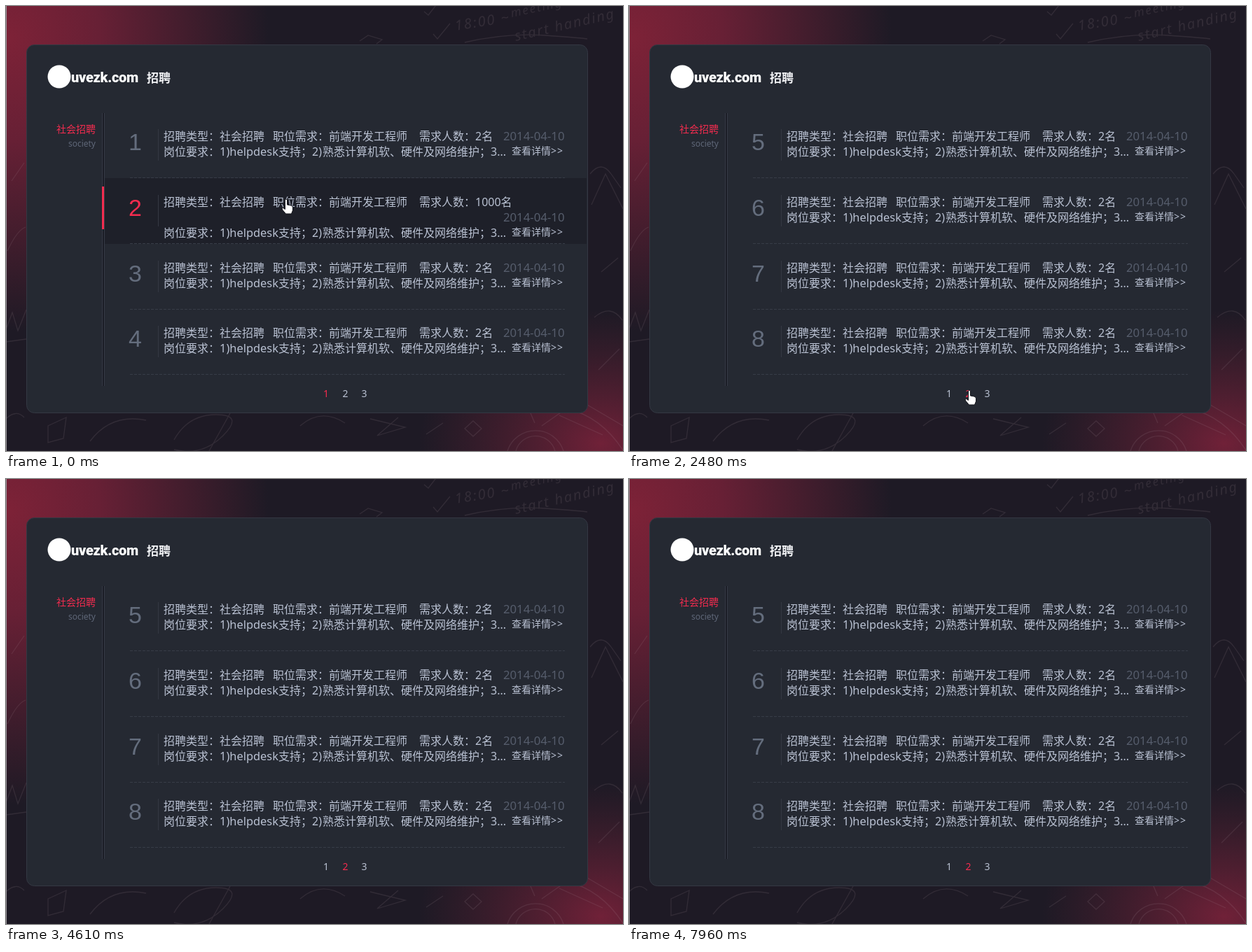
An HTML page for the animation above (8.61 s loop, 881 by 636 pixels).

```html
<!DOCTYPE html>
<html lang="zh-CN">
<head>
<meta charset="utf-8">
<title>招聘</title>
<style>
html, body { margin: 0; width: 100%; height: 100%; overflow: hidden; background: #1e1a25; }
svg { display: block; width: 881px; height: 636px; overflow: hidden; }
text { font-family: "Noto Sans", "Noto Sans CJK SC", "Noto Sans CJK", sans-serif; white-space: pre; }
.num { font-family: "Liberation Sans", Arial, sans-serif; }
.logo { font-family: Roboto, sans-serif; font-weight: 900; letter-spacing: -.3px; }
.chalk { fill: none; stroke: #b9a3ac; stroke-width: 1.3; opacity: .13; }
.chalk text { fill: #b9a3ac; stroke: none; font-style: italic; font-weight: 300; letter-spacing: 2px; }
</style>
</head>
<body>
<svg viewBox="0 0 881 636">
  <defs>
    <radialGradient id="warm" gradientUnits="userSpaceOnUse" cx="0" cy="0" r="1" gradientTransform="translate(5 45) scale(370 420)">
      <stop offset="0" stop-color="#7d2237"/>
      <stop offset=".35" stop-color="#672035"/>
      <stop offset="1" stop-color="#672035" stop-opacity="0"/>
    </radialGradient>
    <radialGradient id="corner" gradientUnits="userSpaceOnUse" cx="0" cy="0" r="1" gradientTransform="translate(850 625) scale(260 190)">
      <stop offset="0" stop-color="#702138"/>
      <stop offset="1" stop-color="#5c2033" stop-opacity="0"/>
    </radialGradient>
  </defs>
  <rect width="881" height="636" fill="#1e1a25"/>
  <rect width="881" height="636" fill="url(#warm)"/>
  <rect width="881" height="636" fill="url(#corner)"/>
  <g class="chalk">
    <path d="M597 8l6 5 14-18M610 40l6 7 18-22M505 50l12-8 20 6-8 6M655 52q60-14 115-10t60 5"/>
    <path d="M0 462l9-24 8 26 12-30M0 480l29-4M2 350q14-30 26-34M0 590q14-14 26-2M8 250l18-26"/>
    <path d="M60 600l26-12-4 30-22 6zM120 622q30-40 80-30M240 620q20-36 60-36t10 30-70 20M290 636l30-54M420 600q30-26 64-4M520 590l50 12-40 12 30-26M600 612l24-16M655 604l12-11 12 11-12 11z"/>
    <path d="M716 636a42 42 0 0 1 80 0M728 636a29 29 0 0 1 56 0M755 596l-6-14M765 600l40-28M790 585l62 28M800 575q50 12 81 60M830 570l51 30"/>
    <path d="M834 240q16-20 30 0l14 20M836 284l20-44 25 50M850 380l24-20M840 445q24-20 40 4M846 520l30-30"/>
    <text x="642" y="35" font-size="20" transform="rotate(-9 642 35)">18:00 ~</text>
    <text x="728" y="50" font-size="20" transform="rotate(-13 728 50)">start handing</text>
    <text x="722" y="16" font-size="17" transform="rotate(-12 722 16)">meeting</text>
  </g>
  <path d="M.5 0V636" stroke="#99949a"/>
  <rect x="29.5" y="55.5" width="801" height="526" rx="11" fill="#252932" stroke="#343843"/>
  <circle cx="76" cy="101" r="16.5" fill="#fff"/>
  <text class="logo" x="93" y="109" font-size="20" fill="#fff">uvezk.com</text>
  <text x="201" y="109" font-size="17" font-weight="700" fill="#f2f3f6">招聘</text>
  <path d="M138.5 153V543" stroke="#1b1d26" stroke-width="3"/>
  <path d="M137.5 153V543M140.5 153V543" stroke="#353945"/>
  <text x="72" y="181" font-size="14" fill="#f42c4f">社会招聘</text>
  <text x="128" y="201" font-size="12" fill="#5f6778" text-anchor="end">society</text>
  <g id="list"></g>
  <path id="cursor" fill="#fff" stroke="#15161c" stroke-linejoin="round"/>
</svg>
<script>
const LOOP = 8610, RED = '#f42c4f', TEXT = '#b9c1d2', DIM = '#565d6c', GREY = '#646d7d';
const PAGER_X = [457, 484.5, 511.5];
const HAND = 'M-1.5 1q1.5-2 3 0v7l5 1q3 .5 3 3v4l-2 5h-8l-5-6q-1-2.5 1-2.5l3 2z';
const ARROW = 'M0 0v14l3.5-3 2.5 5.5 2-1-2.5-5.5h4.5z';

// Pointer moves: start, end, number of steps, then evenly timed waypoints
const moves = [
  [0, 0, 1, [400, 276]],
  [270, 1210, 8, [430, 240], [600, 170], [736, 106], [600, 210], [430, 327]],
  [1360, 1630, 3, [415, 390], [384, 527]],
  [1750, 2200, 4, [400, 550], [450, 566], [486, 549]],
  [2480, 3050, 5, [486, 549], [500, 560], [512, 554]],
  [3610, 4467, 7, [509, 540], [488, 470], [484, 458], [478, 500]],
  [4610, 4610, 1, [-50, -50]],
  [5890, 6820, 8, [620, 511], [520, 440], [470, 262], [440, 310], [432, 341]],
  [6940, 7814, 7, [440, 352], [500, 430], [600, 520], [690, 580], [780, 622]],
  [7960, 7960, 1, [-50, -50]]
];

function pointerAt(t) {
  const [start, end, steps, ...points] = moves.filter(m => m[0] <= t).pop();
  if (steps === 1) return points[0];
  const gaps = steps - 1;
  const step = Math.min(gaps, Math.floor((t - start) / (end - start) * gaps + 1e-6));
  const u = step / gaps * (points.length - 1);
  const i = Math.min(points.length - 2, Math.floor(u));
  return points[i].map((v, axis) => v + (points[i + 1][axis] - v) * (u - i));
}

const pageAt = t => t < 2480 ? 1 : t < 3330 ? 2 : t < 4180 ? 3 : 2;

const label = (x, y, str, size = 16, fill = TEXT, extra = '') =>
  `<text x="${x}" y="${y}" font-size="${size}" fill="${fill}" ${extra}>${str}</text>`;

function row(i, number, active) {
  const dy = Math.round(i * 93.8);
  const wrap = number === 2 ? 22 : 0;
  const y = 192 + dy, y2 = y + 22 + wrap;
  return (active ? `<rect x="141" y="${152 + dy}" width="688" height="94" fill="#1e2029"/>
    <rect x="137" y="${164 + dy}" width="3" height="61" fill="${RED}"/>` : '') +
    `<path d="M177 ${245.5 + dy}H798" stroke="#373c47" stroke-dasharray="4 2"/>
    <path d="M217.5 ${176 + dy}v45" stroke="#343843"/>` +
    label(175, 206 + dy, number, 34, active ? RED : GREY, 'class="num"') +
    label(225, y, '招聘类型：社会招聘') +
    label(381, y, '职位需求：前端开发工程师') +
    label(590, y, `需求人数：${wrap ? 1000 : 2}名`) +
    label(797.5, y + wrap, '2014-04-10', 16.8, DIM, 'text-anchor="end"') +
    label(225, y2, '岗位要求：') +
    label(305, y2, '1)helpdesk', 16.4) +
    label(389, y2, '支持；') +
    label(437, y2, '2)') +
    label(452, y2, '熟悉计算机软、硬件及网络维护；') +
    label(692, y2, '3...') +
    label(722, y2 - 2, '查看详情') +
    label(778, y2 - 2, '&gt;&gt;', 14, TEXT, 'letter-spacing="1"')
      .replace('', '');
}

const list = document.getElementById('list'), cursor = document.getElementById('cursor');
let shown = '';

function draw(now) {
  const t = now % LOOP;
  const [x, y] = pointerAt(t), page = pageAt(t);
  const count = page === 3 ? 3 : 4;
  const pagerY = count === 4 ? 559 : 465;
  const hit = x > 141 && x < 829 ? Math.floor((y - 152) / 93.9) : -1;
  const hover = hit < count ? hit : -1;
  const onPager = PAGER_X.some(px => Math.abs(px - x) < 8) && Math.abs(pagerY - 5 - y) < 9;

  const state = page + ',' + hover;
  if (state !== shown) {
    shown = state;
    let html = '';
    for (let i = 0; i < count; i++) html += row(i, page * 4 - 3 + i, i === hover);
    PAGER_X.forEach((px, i) => {
      html += label(px, pagerY, i + 1, 14, i + 1 === page ? RED : TEXT, 'text-anchor="middle"');
    });
    list.innerHTML = html.replace(/font-size="16"( fill="[^"]*" >查看详情)/g, 'font-size="14"$1');
  }
  cursor.setAttribute('d', hover >= 0 || onPager ? HAND : ARROW);
  cursor.setAttribute('transform', `translate(${x} ${y})`);
  requestAnimationFrame(draw);
}
requestAnimationFrame(draw);
</script>
</body>
</html>
```
